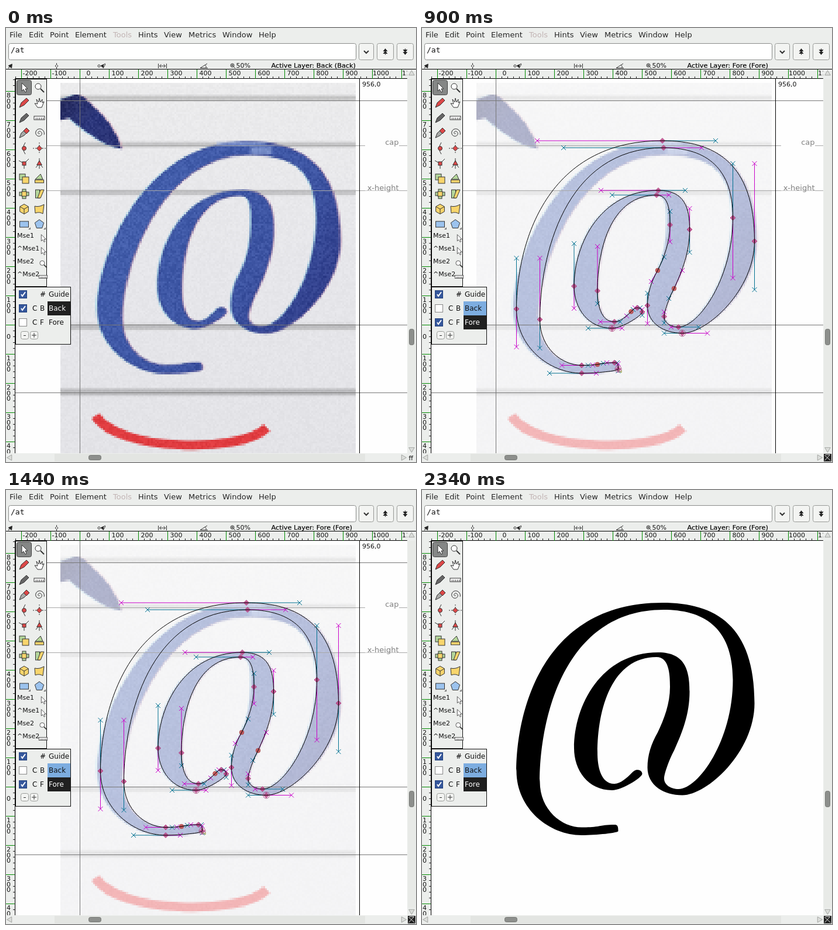
Animation of 701 by 743 pixels, one loop 2.7 s. Source, as an HTML page with a canvas:

```html
<!DOCTYPE html>
<html lang="en">
<head>
<meta charset="utf-8">
<title>Glyph editor</title>
<style>
html, body { margin: 0; width: 100%; height: 100%; overflow: hidden; background: #fefefe; }
#photo, svg { position: absolute; left: 0; top: 0; }
#photo { left: 93px; top: 94px; width: 505px; height: 634px; image-rendering: pixelated; }
svg { width: 701px; height: 743px; }
text { font: 11px "DejaVu Sans", sans-serif; fill: #111; white-space: pre; }
.menu text { font-size: 13px; fill: #262626; }
.menu .off { fill: #c2b4b4; }
.mono { font: 13px "DejaVu Sans Mono", monospace; }
.layers text { font-size: 12px; }
.layers .inv { fill: #fff; }
.status { font-size: 11.3px; fill: #000; stroke: #000; stroke-width: .2; }
.label { font-size: 13px; fill: #808080; text-anchor: end; }
.mid { text-anchor: middle; }
.line, .icon { fill: none; stroke: #333; }
.black { fill: none; stroke: #000; }
.chrome { fill: #eceeec; }
.frame { fill: #eceeec; stroke: #111; }
.button { fill: #f3f4f2; stroke: #989a97; }
.thumb { fill: #8d8f8c; stroke: #777976; }
#photo, .scan, .guides, .edit, .final, .trace { animation: 2.7s step-end infinite; }
#photo { animation-name: fade; }
.scan { animation-name: first; }
.trace { animation-name: later; }
.guides { animation-name: early; }
.edit { animation-name: second; }
.final { animation-name: third; }
@keyframes fade { 0% { opacity: 1 } 33.3333% { opacity: .37 } 66.6667%, 100% { opacity: 0 } }
@keyframes first { 0% { opacity: 1 } 33.3333%, 100% { opacity: 0 } }
@keyframes later { 0% { opacity: 0 } 33.3333%, 100% { opacity: 1 } }
@keyframes early { 0% { opacity: 1 } 66.6667%, 100% { opacity: 0 } }
@keyframes second { 0% { opacity: 0 } 33.3333% { opacity: 1 } 66.6667%, 100% { opacity: 0 } }
@keyframes third { 0% { opacity: 0 } 66.6667%, 100% { opacity: 1 } }
</style>
</head>
<body>
<canvas id="photo" width="153" height="192"></canvas>
<svg viewBox="0 0 701 743">
  <defs>
    <clipPath id="topClip"><rect x="16" y="71" width="670" height="16"/></clipPath>
    <clipPath id="sideClip"><rect y="87" width="16" height="641"/></clipPath>
  </defs>

  <g class="guides">
    <path class="line" style="stroke:#a8a8a8" d="M16 201.5H614m58 0H686M16 278.5H686"/>
    <path class="line" style="stroke:#777" d="M126.5 87V728M16 124.5H686M16 508.5H686M16 624.5H686"/>
    <path class="black" d="M604.5 87V728"/>
    <rect class="blank" x="614" y="267" width="58" height="14" fill="#fefefe" opacity=".4"/>
    <text x="609" y="100">956,0</text>
    <text class="label" x="671.5" y="200">cap</text>
    <text class="label" x="671.5" y="278">x-height</text>
  </g>
  <g class="edit" id="edit"></g>
  <path class="final" id="glyph"/>

  <path class="chrome" d="M0 0H701V743H0ZM16 87V728H686V87Z" fill-rule="evenodd"/>
  <g class="menu" id="menu"></g>
  <g id="bar"></g>
  <text class="mono" x="8" y="42">/at</text>
  <text x="393.5" y="68">50%</text>
  <text class="status scan" x="453.5" y="68">Active Layer: Back (Back)</text>
  <text class="status trace" x="453.5" y="68">Active Layer: Fore (Fore)</text>
  <path class="black" d="M0 70.5H701M15.5 728V86.5H686"/>
  <g id="top" clip-path="url(#topClip)"></g>
  <g id="side" clip-path="url(#sideClip)"></g>
  <g id="scroll"></g>
  <text class="scan" x="688.5" y="740" font-style="italic">ff</text>
  <g class="trace" id="corner"></g>
  <g id="tools"></g>
  <g class="layers" id="layers"></g>
</svg>
<script>
const $ = id => document.getElementById(id);
const text = (x, y, s, cls = '') => `<text class="${cls}" x="${x}" y="${y}">${s}</text>`;
const path = (d, attrs = '') => `<path d="${d}" ${attrs}/>`;
const line = (d, cls = 'line') => path(d, `class="${cls}"`);
const rect = (x, y, w, h, attrs = '') => `<rect x="${x}" y="${y}" width="${w}" height="${h}" ${attrs}/>`;
const disc = (r, attrs = '', x = 0, y = 0) => `<circle cx="${x}" cy="${y}" r="${r}" ${attrs}/>`;
const at = (x, y, s, k = 1) => `<g class="icon" transform="translate(${x} ${y}) scale(${k})">${s}</g>`;
const box = (w, h, attrs, x = 0, y = 0) => rect(x - w / 2, y - h / 2, w, h, attrs);
const ngon = (n, r, attrs, turn = 0) => {
  const p = Array.from({ length: n }, (_, i) => {
    const a = (i / n - .25 + turn) * 2 * Math.PI;
    return [r * Math.cos(a), r * Math.sin(a)].map(v => v.toFixed(2));
  });
  return `<polygon points="${p.join(' ')}" ${attrs}/>`;
};
const fill = c => `fill="${c}"`;
const green = fill('#b5d79b'), gold = fill('#f8d56c'), blue = fill('#9cc3ee'), red = fill('#dc4848'), white = fill('#fff'), dark = fill('#222');

// Menu, word field and status icons
let x = 6;
$('menu').innerHTML = 'File Edit Point Element Tools Hints View Metrics Window Help'.split(' ').map(s => {
  const out = text(x, 16, s, s === 'Tools' ? 'off' : '');
  const c = document.createElement('canvas').getContext('2d');
  c.font = '13px "DejaVu Sans", sans-serif';
  x += Math.round(c.measureText(s).width) + 11;
  return out;
}).join('');

const button = (x, w) => rect(x, 26.5, w, 28, 'rx="3" class="button"');
const page = path('M0-5L4 0H-4ZM0-1L4 4H-4Z', dark + ' stroke="none"') + path('M0 3V6');
const lens = disc(5, white, -2, -2) + path('M2 2L8 8', 'stroke-width="2"');
$('bar').innerHTML =
  rect(4.5, 26.5, 594, 28, 'rx="3" fill="#fff" stroke="#8a8c8a"') +
  button(603.5, 25) + button(634.5, 28) + button(668.5, 28) +
  at(616, 41, path('M-4-2L0 2L4-2', 'stroke-width="2"')) +
  at(648.5, 40, page) + `<g transform="translate(682.5 41) rotate(180)" class="icon">${page}</g>` +
  at(8, 65, path('M-4 4L2-3', 'stroke="#000"') + ngon(3, 4, dark, .1)) +
  at(86.5, 65, path('M0-5V5') + ngon(4, 2.5, white)) +
  at(165, 65, disc(2, '', -6) + path('M-3 0L5-4M1 4L5-3') + ngon(3, 3, dark, .1)) +
  at(267.5, 65, path('M-7-4V4M7-4V4M-5 0H5M-2-3L-5 0L-2 3M2-3L5 0L2 3')) +
  at(338, 65, path('M7 3.5H-6L6-4M2-2Q5 0 4 3')) +
  at(387, 65, disc(3, '', 0, -1) + path('M2 1L5 4M-2-1H2M0-3V1'));

// Rulers: fifty pixels for a hundred units
const rx = u => 126.5 + u / 2, ry = u => 508.5 - u / 2;
const ruler = (id, from, to, tick, label) => {
  let out = '';
  for (let u = from; u <= to; u += 20) {
    const major = u % 100 === 0;
    out += path(tick(u, major), `stroke="${major ? '#008a00' : '#222'}"`) + (major ? label(u) : '');
  }
  $(id).innerHTML = out;
};
ruler('top', -220, 1120, (u, m) => `M${rx(u)} ${m ? 71 : 83}V87`, u => text(rx(u) + 14.5, 81, u, 'mid'));
ruler('side', -440, 840, (u, m) => `M${m ? 0 : 12} ${ry(u)}H15`, u => [...String(Math.abs(u))]
  .map((c, i) => text(4.5, ry(u) + (u ? 10.5 : 23.5) + i * 9.6, c, 'mid')).join(''));

// Scrollbars
const tip = (x, y, turn) => at(x, y, ngon(3, 5.5, 'fill="#dcdedb" stroke="#a2a4a1"', turn));
$('scroll').innerHTML =
  rect(83, 729, 531, 13, fill('#e3e5e2')) + rect(687, 87, 13, 628, fill('#e8eae7')) +
  rect(689.5, 515.5, 8, 27, 'rx="3" class="thumb"') + rect(141.5, 731.5, 21, 8, 'rx="3" class="thumb"') +
  tip(693.5, 78, 0) + tip(693.5, 721, .5) + tip(7, 735.5, .75) + tip(679, 735.5, .25);
$('corner').innerHTML = rect(687, 729, 13, 13, dark) +
  at(693.5, 735.5, path('M-5-4L5 5M-5 5L4-5M-4-5H4', 'stroke="#ddd"'));

// Tool palette, two icons per row
const icons = [];
const tool = (...parts) => icons.push(parts.join(''));
const arrow = path('M-4-8V6L-1 3L2 8L4 7L2 2H6Z', white);
const scale = box(18, 6, white) + path('M-6 1H8', 'stroke-width="3" stroke-dasharray="1 2"');
const more = path('M11 5V9H7Z', 'fill="#777" stroke="none"');
const blade = 'M-8 8L-5 0L4-8L8-4L0 4Z';
const spiral = Array.from({ length: 40 }, (_, i) => {
  const a = i * .33, r = i * .22;
  return `${i ? 'L' : 'M'}${(r * Math.cos(a)).toFixed(1)} ${(r * Math.sin(a)).toFixed(1)}`;
}).join('');
tool(arrow);
tool(lens);
tool(path(blade, red));
tool(path('M-3 8L-8 1L-3 2L-5-6L-1-1L0-8L2-1L5-6V0L8-2L4 8Z', white));
tool(path(blade, fill('#666')));
tool(scale);
tool(path(blade, fill('#a9aaa8')), at(4, -4, ngon(4, 5, red)));
tool(path(spiral));
tool(path('M2-10Q-5 0 2 10'), disc(3.5, red));
tool(path('M-11 0H11M0-10V10', 'stroke-dasharray="2"'), ngon(4, 4.5, red));
tool(path('M-9-5L0 0L8-8M0 0V9'), box(6, 6, red));
tool(path('M0-9V9M-6 7L0 0L6 7'), ngon(3, 5, red));
tool(box(10, 10, green, -3, -3), box(11, 11, gold, 2.5, 2.5));
tool(path('M-7 1L2-8L6 1Z', green), box(15, 5, gold, 0, 4.5));
tool(box(16, 6, green), box(6, 16, green), box(8, 8, gold));
tool(box(7, 14, green, -3), path('M2-7H8L2 7H-3Z', gold));
tool(ngon(6, 8.5, gold), path('M-7-4L0 0L7-4M0 0V8'));
tool(path('M-8-5Q0-3 8-8L6 8Q0 4-7 7Z', gold));
tool(box(15, 10, blue), more);
tool(ngon(5, 8, blue), more);

const buttons = [arrow, arrow, lens, scale];
$('tools').innerHTML = rect(16.5, 87.5, 53, 355, 'class="frame"') +
  rect(18.5, 89.5, 25, 25, 'rx="3" fill="#858786" stroke="#444"') +
  icons.map((s, i) => at(i % 2 ? 57 : 31, 102 + 26 * (i >> 1), s)).join('') +
  ['Mse1', '^Mse1', 'Mse2', '^Mse2'].map((s, i) =>
    text(19, 359 + 22 * i, s) + at(63.5, 360 + 22 * i, buttons[i], .8)).join('');

// Layer palette
const group = (cls, s) => `<g class="${cls}">${s}</g>`;
const check = (y, cls) => group(cls, at(29, y, box(13, 13, 'fill="#35579c" stroke="#24427d"') +
  path('M-3 0L-1 3L4-4', 'stroke="#fff" stroke-width="2"')));
const bar = (y, c) => rect(71, y, 39, 24, fill(c));
const back = cls => text(73, 484, 'Back', cls), fore = cls => text(73, 508, 'Fore', cls);
$('layers').innerHTML = rect(16.5, 443.5, 94, 98, 'class="frame"') +
  [456, 480, 504].map((y, i) => at(29, y, box(13, 13, 'fill="#fff" stroke="#888"')) +
    text(45, y + 4, i ? 'C' : '') + text(58, y + 4, '#BF'[i])).join('') +
  check(456, '') + check(480, 'scan') + check(504, 'trace') + text(73, 460, 'Guide') +
  group('scan', bar(468, '#202020') + back('inv') + fore('')) +
  group('trace', bar(468, '#7dade0') + bar(492, '#202020') + back('') + fore('inv')) +
  at(32, 526, box(13, 13, 'rx="3" class="button"') + path('M-2 .5H2')) +
  at(48, 526, box(13, 13, 'rx="3" class="button"') + path('M-4 0H4M0-4V4'));

// Glyph nodes: h and v have level or upright handles, the scan has a slimmer shoulder
function trace(scan) {
  const nodes = [];
  const p = (x, y, ax, ay, bx, by, type = 'curve', ring) => nodes.push({ x, y, ax, ay, bx, by, type, ring });
  const h = (x, y, a, b, ring) => p(x, y, a, y, b, y, 'extreme', ring);
  const v = (x, y, a, b, ring) => p(x, y, x, a, x, b, 'extreme', ring);
  const pick = (ink, curve) => scan ? ink : curve;
  h(411, pick(195, 193), pick(235, 197), 502);
  v(pick(571, 568.5), 365, 232, 448);
  h(445, 522.5, 488, 414, true);
  v(385.5, 475, 506, 454);
  p(403, 415, 392, 434, 414, 392);
  v(pick(420, 424), 337, 366, 314);
  h(401, 286, 422, 325);
  v(300, 450, 374, 472);
  h(329, 503, 305, 339);
  p(357.5, 485.5, 350, 493, 361, 482);
  h(368, 479, 364, 373);
  v(376.5, 486, 482, 492);
  h(325, 514, 342, 284, true);
  v(260, 442, 480, 369);
  h(404, 278, 306, 450);
  v(457.5, 345, 309, 384);
  p(431, 446, 445, 415, 422, 463);
  v(414, 494, 486, 505);
  h(438.5, 512, 426, 473);
  v(531.5, 325, 428, 232);
  h(413, pick(217, 205), 478, pick(275, 242));
  v(pick(198, 201.5), 499, 394, 548);
  h(273, 577.5, 239, 284);
  p(300, 576, 292, 577, 310, 574);
  h(329, 573, 316, 334);
  v(335.5, 584, 575, 587, true);
  h(273, 591, 298, 218);
  v(pick(157, 161.5), 481, 546, 394);
  return nodes;
}
const outline = nodes => nodes.reduce((d, n, i) => {
  const m = nodes[(i + 1) % nodes.length];
  return d + `C${n.bx} ${n.by} ${m.ax} ${m.ay} ${m.x} ${m.y}`;
}, `M${nodes[0].x} ${nodes[0].y}`) + 'Z';

const nodes = trace(false), shape = outline(nodes);
$('glyph').setAttribute('d', shape);
const handle = (x, y, hx, hy, color) =>
  path(`M${x} ${y}L${hx} ${hy}m-4-4l8 8m0-8l-8 8`, `fill="none" stroke="${color}"`);
$('edit').innerHTML =
  nodes.map(n => handle(n.x, n.y, n.bx, n.by, '#007090') + handle(n.x, n.y, n.ax, n.ay, '#c800c8')).join('') +
  nodes.map(n => at(n.x, n.y, `<g opacity=".85" stroke="#a83878">` +
    (n.type === 'curve' ? disc(3.8, 'fill="#c84848" stroke="#a03c3c"') : ngon(4, 4.5, fill('#c04488'))) +
    (n.ring ? disc(5.5) : '') + '</g>')).join('') +
  line(shape, 'black') + path('M336 586L341 590V586', 'fill="none" stroke="#8a9a30"');

// Scanned handwriting, painted at low resolution
const cv = $('photo'), g = cv.getContext('2d');
const ramp = (x0, y0, x1, y1, ...colors) => {
  const r = g.createLinearGradient(x0, y0, x1, y1);
  colors.forEach((c, i) => r.addColorStop(i / (colors.length - 1), c));
  return r;
};
const paint = (shape, color) => {
  for (const [dx, c] of [[-3, 'rgba(110,205,235,.5)'], [3, 'rgba(225,150,170,.45)'], [0, color]]) {
    g.save();
    g.translate(dx, 0);
    g.fillStyle = c;
    g.fill(shape);
    g.restore();
  }
};
g.scale(cv.width / 505, cv.height / 634);
g.translate(-93, -94);
g.fillStyle = ramp(0, 94, 0, 728, '#ebebec', '#e6e6ea', '#e3e3e7');
g.fillRect(93, 94, 505, 634);
for (const [y, h] of [[115, 9], [195, 10], [277, 9], [506, 11], [616, 14]]) {
  g.fillStyle = 'rgba(120,120,120,.22)';
  g.fillRect(93, y, 505, h);
  g.fillRect(93, y + 3, 505, h - 5);
}
const ink = new Path2D(outline(trace(true)));
paint(ink, ramp(190, 230, 560, 480, '#4662ae', '#405aa8', '#3d54a2', '#2e3a86'));
g.strokeStyle = 'rgba(38,48,130,.5)';
g.lineWidth = 3;
g.stroke(ink);
g.fillStyle = 'rgba(165,185,228,.55)';
g.fillRect(418, 204, 36, 12);
g.fillRect(360, 195, 85, 6);
paint(new Path2D('M80 128L118 114Q130 113 141 126Q187 165 198 207Q165 203 108 154L80 160Z'),
  ramp(100, 120, 190, 200, '#272b5e', '#2c377c', '#2b3374'));
g.strokeStyle = '#e03c40';
g.lineWidth = 16;
g.stroke(new Path2D('M153 664C190 724 400 730 446 684'));

let seed = 7;
const random = () => (seed = seed * 16807 % 2147483647) / 2147483647;
const img = g.getImageData(0, 0, cv.width, cv.height), px = img.data;
for (let i = 0; i < px.length; i += 4) {
  const d = (random() - .5) * (px[i] < 140 ? 20 : px[i + 1] < 120 ? 14 : 7);
  for (let k = 0; k < 3; k++) px[i + k] += d;
}
g.putImageData(img, 0, 0);
</script>
</body>
</html>
```
